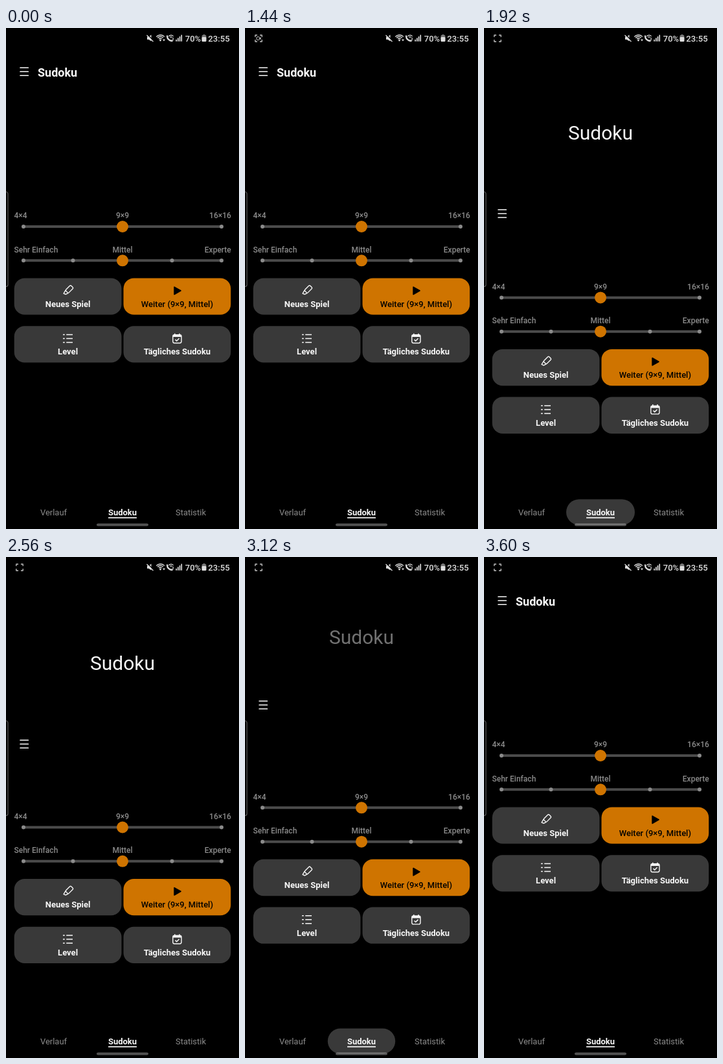
Write an HTML page with a canvas that moves like this. It is 360 px wide and 772 px high and loops after 3.68 s.

```html
<!DOCTYPE html>
<html lang="de">
<head>
<meta charset="utf-8">
<title>Sudoku</title>
<style>
  html, body { margin: 0; width: 100%; height: 100%; overflow: hidden; background: #000; }
  canvas { display: block; width: 360px; height: 772px; }
</style>
</head>
<body>
<canvas id="stage"></canvas>
<script>
const W = 360, H = 772, LOOP = 3680, STEP = 80;
const ORANGE = '#cf7400', CARD = '#393939', GREY = '#8b8b8b', WHITE = '#f8f8f8', STATUS = '#dedede';
const canvas = document.getElementById('stage');
const ctx = canvas.getContext('2d');
const dpr = window.devicePixelRatio || 1;
canvas.width = W * dpr;
canvas.height = H * dpr;

const clamp = v => Math.max(0, Math.min(1, v));
const decelerate = p => 1 - (1 - clamp(p)) ** 2;

function text(str, x, y, size, weight, color, align = 'left') {
  ctx.font = `${weight} ${size}px Roboto, sans-serif`;
  ctx.textAlign = align;
  ctx.fillStyle = color;
  ctx.fillText(str, x, y);
}

function box(x, y, w, h, r, color) {
  ctx.fillStyle = color;
  ctx.beginPath();
  ctx.roundRect(x, y, w, h, r);
  ctx.fill();
}

function dot(x, y, r, color) {
  ctx.fillStyle = color;
  ctx.beginPath();
  ctx.arc(x, y, r, 0, Math.PI * 2);
  ctx.fill();
}

// Each path is a flat list of x, y pairs.
function lines(color, width, ...paths) {
  ctx.strokeStyle = color;
  ctx.lineWidth = width;
  ctx.beginPath();
  for (const p of paths) {
    ctx.moveTo(p[0], p[1]);
    for (let i = 2; i < p.length; i += 2) ctx.lineTo(p[i], p[i + 1]);
  }
  ctx.stroke();
}

function shape(color, ...p) {
  ctx.fillStyle = color;
  ctx.beginPath();
  for (let i = 0; i < p.length; i += 2) ctx.lineTo(p[i], p[i + 1]);
  ctx.closePath();
  ctx.fill();
}

function arcs(x, y, radii, color, width) {
  ctx.strokeStyle = color;
  ctx.lineWidth = width;
  for (const r of radii) {
    ctx.beginPath();
    ctx.arc(x, y, r, -Math.PI * 0.77, -Math.PI * 0.23);
    ctx.stroke();
  }
}

function faded(alpha, draw) {
  if (alpha <= 0) return;
  ctx.save();
  ctx.globalAlpha = alpha;
  draw();
  ctx.restore();
}

function statusBar() {
  // muted speaker
  shape(STATUS, 218, 13.5, 220.5, 13.5, 224.5, 10.5, 224.5, 20.5, 220.5, 17.8, 218, 17.8);
  lines('#000', 1.2, [218.5, 10, 228.5, 20]);
  lines(STATUS, 1.3, [217.5, 11, 227.5, 21]);
  // wifi
  arcs(238.5, 19, [3, 5.7, 8.3], STATUS, 1.4);
  dot(238.5, 19, 1.4, STATUS);
  shape(STATUS, 242, 17.5, 246, 17.5, 244, 20.5);
  // call over wifi
  ctx.strokeStyle = STATUS;
  ctx.lineWidth = 2.4;
  ctx.beginPath();
  ctx.moveTo(249, 11.5);
  ctx.quadraticCurveTo(249, 19.5, 257.5, 20);
  ctx.stroke();
  arcs(255, 16, [2.2, 4.8], STATUS, 1.2);
  text('2', 256.2, 18.6, 6, 700, STATUS);
  // signal
  for (let i = 0; i < 4; i++) {
    const h = 3 + i * 2.4;
    box(262.3 + i * 2.7, 20.7 - h, 1.7, h, 0.4, STATUS);
  }
  text('70%', 276.8, 20.5, 13, 500, STATUS);
  // battery
  box(304.3, 10, 3.4, 2, 0.5, '#777');
  box(302.6, 11, 6.8, 10, 1.4, '#777');
  box(302.6, 14, 6.8, 7, 1.2, STATUS);
  text('23:55', 312.3, 20.5, 13.2, 500, STATUS);
}

function recorder(alpha, camera) {
  faded(alpha, () => {
    const c = '#c4c4c4';
    lines(c, 1.3,
      [15.8, 14, 15.8, 11, 19, 11], [23, 11, 26.2, 11, 26.2, 14],
      [26.2, 18, 26.2, 21, 23, 21], [19, 21, 15.8, 21, 15.8, 18]);
    if (!camera) return;
    ctx.lineWidth = 1;
    ctx.beginPath();
    ctx.roundRect(18, 13.7, 4.4, 4.6, 0.8);
    ctx.stroke();
    shape(c, 22.6, 15.6, 24.6, 14, 24.6, 18, 22.6, 16.4);
  });
}

function header(h) {
  for (const y of [61.3, 67.3, 73.3]) box(21.3, y + h - 0.75, 13.7, 1.5, 0.5, WHITE);
  faded(clamp((100 - h) / 60), () => text('Sudoku', 49, 74.5 + h, 18, 600, WHITE));
  faded(clamp((h - 112) / 107), () =>
    text('Sudoku', 180, 173.7 - 0.65 * (221 - h), 30, 400, WHITE, 'center'));
}

function slider(y, stops, labels) {
  text(labels[0], 12.5, y - 12.7, 12, 500, GREY);
  text(labels[1], 180, y - 12.7, 12, 500, GREY, 'center');
  text(labels[2], 347.8, y - 12.7, 12, 500, GREY, 'right');
  box(27, y - 2, 306, 4, 2, '#4b4b4b');
  for (let i = 0; i < stops; i++) dot(27 + 306 * i / (stops - 1), y, 3, GREY);
  dot(180, y, 9, ORANGE);
}

const icons = {
  pencil() {
    ctx.rotate(Math.PI / 4);
    ctx.beginPath();
    ctx.roundRect(-3.2, -9, 6.4, 11.4, 1.6);
    ctx.stroke();
    lines(WHITE, 1.4, [-3, 2, -1.6, 7.6, 1.6, 6.4, 3, 2]);
  },
  play() {
    ctx.strokeStyle = '#000';
    ctx.lineWidth = 1.6;
    ctx.beginPath();
    ctx.moveTo(-4.3, -5.7);
    ctx.lineTo(5.6, 0);
    ctx.lineTo(-4.3, 5.7);
    ctx.closePath();
    ctx.fillStyle = '#000';
    ctx.fill();
    ctx.stroke();
  },
  list() {
    for (const y of [-6, 0, 6]) lines(WHITE, 1.5, [-7.6, y, -4.8, y], [-2.4, y, 7.4, y]);
  },
  calendar() {
    ctx.beginPath();
    ctx.roundRect(-6.6, -5.8, 13.2, 12.8, 2.4);
    ctx.stroke();
    box(-6.6, -5.8, 13.2, 3.4, [2, 2, 0, 0], WHITE);
    lines(WHITE, 1.5, [-3.6, -7.8, -3.6, -5], [3.6, -7.8, 3.6, -5], [-2.9, 1.6, -0.7, 3.7, 3.2, -0.2]);
  }
};

function button(x, y, label, icon, fill = CARD, color = WHITE, weight = 600) {
  box(x, y, 165.8, 56.3, 16, fill);
  ctx.save();
  ctx.translate(x + 82.9, y + 19.3);
  ctx.strokeStyle = color;
  ctx.lineWidth = 1.4;
  icons[icon]();
  ctx.restore();
  text(label, x + 82.9, y + 44, 13, weight, color, 'center');
}

function content(dy) {
  slider(306 + dy, 3, ['4×4', '9×9', '16×16']);
  slider(358.3 + dy, 5, ['Sehr Einfach', 'Mittel', 'Experte']);
  button(12.7, 385.5 + dy, 'Neues Spiel', 'pencil');
  button(181.5, 385.5 + dy, 'Weiter (9×9, Mittel)', 'play', ORANGE, '#000', 500);
  button(12.7, 459.2 + dy, 'Level', 'list');
  button(181.5, 459.2 + dy, 'Tägliches Sudoku', 'calendar');
}

// Highlight behind the tab; e is the time since it was touched.
function tabPill(e) {
  if (e < 0) return;
  const alpha = clamp((e + 40) / 120) * clamp(1 - (e - 400) / 320);
  const s = 0.94 + 0.06 * clamp(e / 320);
  faded(alpha, () => box(180 - 53 * s, 746 - 19.7 * s, 106 * s, 39.4 * s, 19.7 * s, CARD));
}

function tabs(t) {
  tabPill(t - (t < 2880 ? 1600 : 2880));
  text('Verlauf', 73.5, 750.8, 13, 400, GREY, 'center');
  text('Sudoku', 180, 750.8, 13, 600, WHITE, 'center');
  text('Statistik', 285.5, 750.8, 13, 400, GREY, 'center');
  box(158, 753.7, 44, 1.8, 0.5, WHITE);
  box(140, 763.4, 80, 4.2, 2.1, 'rgba(255,255,255,0.32)');
}

function edgeHandle() {
  ctx.strokeStyle = '#5c5c5c';
  ctx.lineWidth = 1.2;
  ctx.beginPath();
  ctx.roundRect(-8, 252.5, 11, 146, 3);
  ctx.stroke();
}

const cameraOn = t => [[560, 880], [1440, 1840], [2160, 2560], [3200, 3600]]
  .some(([from, to]) => t >= from && t < to);

function draw(t) {
  ctx.setTransform(dpr, 0, 0, dpr, 0, 0);
  ctx.lineCap = 'butt';
  ctx.lineJoin = 'round';
  ctx.fillStyle = '#000';
  ctx.fillRect(0, 0, W, H);
  const h = 221 * (decelerate((t - 1749) / 190) - decelerate((t - 3092) / 190));
  header(h);
  content(h / 2);
  tabs(t);
  edgeHandle();
  statusBar();
  recorder(t < 560 ? 0 : clamp((t - 480) / 240), cameraOn(t));
}

const start = performance.now();
function tick() {
  const t = (performance.now() - start) % LOOP;
  draw(Math.floor(t / STEP) * STEP);
  requestAnimationFrame(tick);
}
tick();
</script>
</body>
</html>
```
